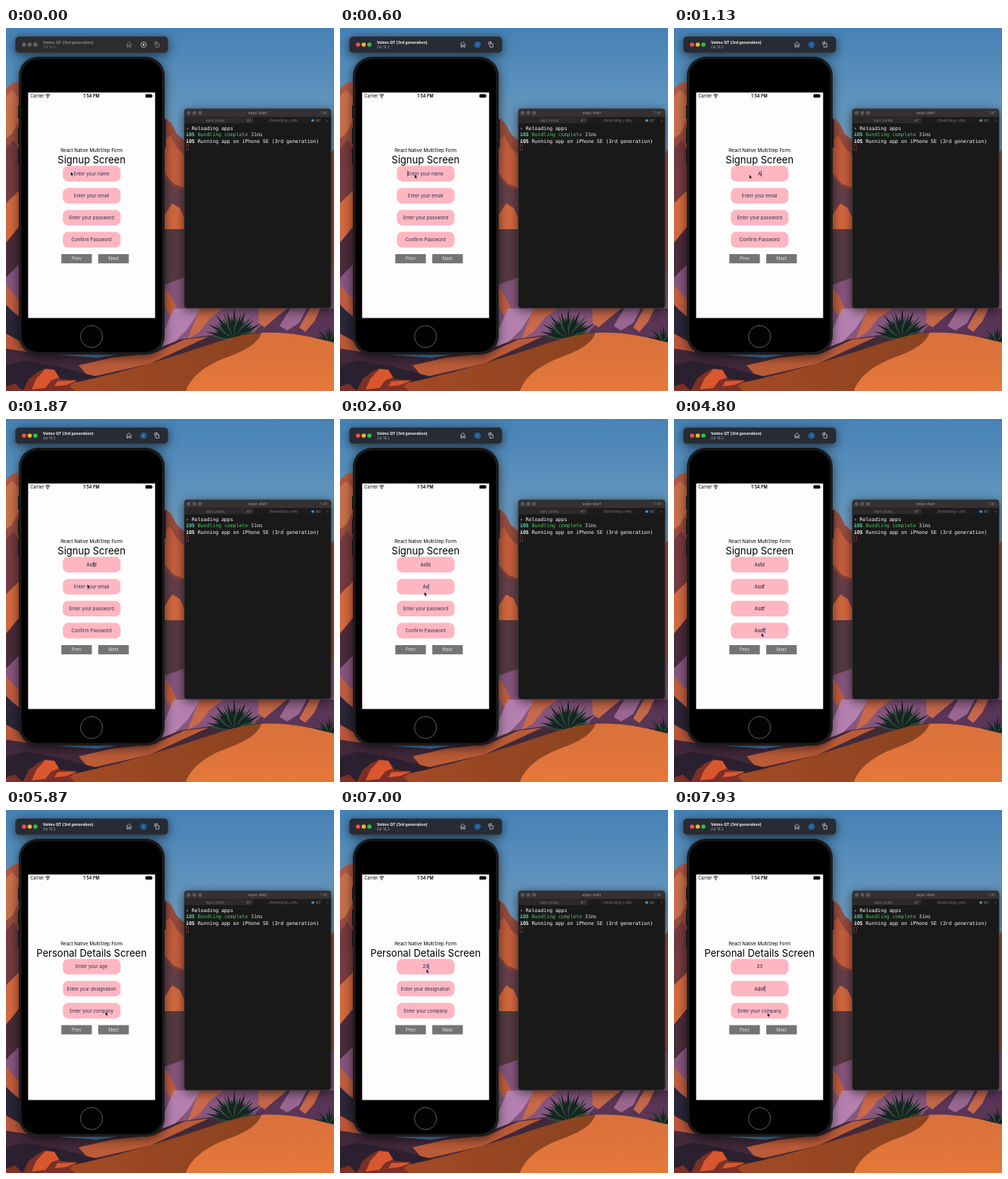
An HTML page that plays this animation: 434 by 480 pixels, repeating every 8000 ms.

```html
<!DOCTYPE html>
<html lang="en">
<head>
<meta charset="utf-8">
<title>Multi-step form demo</title>
<style>
  html, body { margin: 0; width: 100%; height: 100%; overflow: hidden; background: #4682b6; }
  svg { display: block; width: 434px; height: 480px; }
  text { font-family: Inter, "Liberation Sans", sans-serif; white-space: pre; }
  .mono text { font-family: "DejaVu Sans Mono", "Liberation Mono", monospace; font-size: 6.5px; fill: #fff; }
  .tabs text { font-size: 4.4px; fill: #827d7e; text-anchor: middle; }
  .form text { font-size: 6.12px; text-anchor: middle; }
  .form .heading { font-size: 13px; }
  .shadow { filter: drop-shadow(0 3px 7px rgba(0, 0, 0, .6)); }
  #bar { --bg: #2d2b2d; --title: #8b8888; --sub: #747171; --icon: #8d8b8c; --rec: #c9c9c9; --r: #646263; --y: #646263; --g: #646263; --disc: none; }
  #bar.active { --bg: #272b33; --title: #f3f3f5; --sub: #a2a5ad; --icon: #c9ccd2; --rec: #2f8fe0; --r: #fb4f48; --y: #f7b52d; --g: #2fc440; --disc: #164d86; }
</style>
</head>
<body>
<svg viewBox="0 0 434 480">
  <defs>
    <linearGradient id="sky" x2="0" y2="1">
      <stop stop-color="#4682b6"/><stop offset=".45" stop-color="#6295bd"/><stop offset="1" stop-color="#8ba9c4"/>
    </linearGradient>
    <linearGradient id="cliff" x2="0" y2="1">
      <stop stop-color="#b65c43"/><stop offset=".4" stop-color="#8f4840"/><stop offset="1" stop-color="#553039"/>
    </linearGradient>
    <linearGradient id="shade" x2="1" y2="0">
      <stop stop-color="#a94c26"/><stop offset="1" stop-color="#8a431f"/>
    </linearGradient>
    <linearGradient id="dune" x2="0" y2="1">
      <stop stop-color="#d9713c"/><stop offset="1" stop-color="#e5783a"/>
    </linearGradient>
  </defs>

  <!-- Desert -->
  <rect width="434" height="240" fill="url(#sky)"/>
  <path fill="url(#cliff)" d="M0 80 8 73 20 70 60 62 130 70 190 98 211 119 219 126 226 140 240 152V340H0Z"/>
  <path fill="#c8704c" d="M0 90 8 82 18 92 17 122 8 140 0 146Z"/>
  <path fill="#763b40" d="M0 160 10 148 18 162V216L0 228Z"/>
  <path fill="#c65f3e" d="M208 150 217 142 226 158 238 170V212L222 206 208 190Z"/>
  <path fill="#66404a" d="M208 196 222 210 238 216V244L208 232Z"/>
  <path fill="#d4693f" d="M208 250 220 232 230 238 238 256V270H208ZM0 232 18 214V262L0 284Z"/>
  <path fill="#563b42" d="M208 266H238V344H208Z"/>
  <path fill="#4b2c3b" d="M0 284 18 262V312L0 330Z"/>
  <path fill="#9d4c38" d="M428 168 434 160V330H428Z"/>
  <path fill="#87567e" d="M0 330 18 312 208 340 236 330 434 320V430H0Z"/>
  <path fill="#bf5e40" d="M0 340 20 362V384L0 366ZM208 342 216 350 228 374 220 384 208 366Z"/>
  <path fill="#b481ae" d="M222 371H258L240 398 222 416 208 422V404Z"/>
  <path fill="#c9684a" d="M256 371H288L270 384 256 402 240 412 248 392Z"/>
  <path fill="#593556" d="M330 400 348 384 362 371H434V420H330Z"/>
  <path fill="#c4674a" d="M334 371H372L356 384 342 396 334 390ZM402 371H416L408 388 396 402 388 396Z"/>
  <path fill="#996690" d="M376 371H398L388 390 372 400 362 394Z"/>
  <path fill="#2c2639" d="M0 366 8 374 20 384 30 400 60 428 0 432Z"/>
  <path fill="#b9573a" d="M0 404 18 414 44 436 0 428Z"/>
  <path fill="#41293a" d="M0 424 40 430 120 436 200 424 230 412 300 402V480H0Z"/>
  <path fill="#ba5b38" d="M96 446 140 436 196 430 236 412 268 408 190 444 110 462Z"/>
  <path fill="#2b2030" d="M0 446 24 440 70 448 124 462 110 480H0Z"/>
  <g id="agave" fill="none" stroke-linecap="round"></g>
  <path fill="url(#shade)" d="M20 480C110 470 190 444 250 425 290 412 312 404 338 403V480Z"/>
  <path fill="url(#dune)" d="M338 403C372 401 404 408 434 416V480H238C246 458 268 444 296 434 318 426 334 416 338 403Z"/>
  <path fill="#7c3026" d="M22 480 30 464 42 455 52 450 64 452 72 464 94 466 84 474 92 480ZM0 474 12 470 22 480H0Z"/>
  <path fill="#d9572e" d="M34 478 40 464 52 451 64 452 70 462 60 466 52 476ZM68 467 94 466 80 472 64 474Z"/>

  <!-- Phone -->
  <g class="shadow">
    <path fill="#111" d="M16 102h2v18h-2zM16 132h2v21h-2zM16 159h2v21h-2zM209 121h2.3v37h-2.3z"/>
    <rect x="17" y="38" width="193" height="394" rx="25" fill="#1c1c1e"/>
    <rect x="20.5" y="41.5" width="186" height="387" rx="22" fill="#000"/>
  </g>
  <circle cx="113.2" cy="408" r="14.6" fill="#030303" stroke="#666" stroke-width=".9"/>
  <rect x="29.3" y="85.3" width="168" height="298.2" fill="#fdfdfd"/>
  <text x="32.3" y="92" font-size="5.5">Carrier</text>
  <text x="113" y="92" font-size="5.6" font-weight="600" text-anchor="middle">1:54 PM</text>
  <path d="M52.2 89a4 4 0 0 1 6 0M53.4 90.4a2.4 2.4 0 0 1 3.6 0" fill="none" stroke="#000" stroke-width="1"/>
  <circle cx="55.2" cy="91.9" r=".8"/>
  <rect x="184.5" y="87.5" width="8.6" height="4.6" rx="1.2"/><rect x="193.5" y="89" width=".8" height="1.7"/>

  <!-- Simulator bar -->
  <g id="bar">
    <rect class="shadow" x="12.3" y="11.3" width="202" height="21.5" rx="5" fill="var(--bg)" stroke="#42444a" stroke-width=".5"/>
    <circle cx="23.9" cy="22" r="2.8" fill="var(--r)"/>
    <circle cx="31.4" cy="22" r="2.8" fill="var(--y)"/>
    <circle cx="38.9" cy="22" r="2.8" fill="var(--g)"/>
    <text x="48.7" y="21.3" font-size="5.2" font-weight="700" fill="var(--title)">Velmo QT (3rd generation)</text>
    <text x="48.7" y="27.2" font-size="4.7" fill="var(--sub)">Zel 16.2</text>
    <g fill="none" stroke="var(--icon)" stroke-width=".8">
      <path d="M159 22 162.7 18.4 166.4 22M160.2 21.5V25.2H161.7V22.8H163.7V25.2H165.2V21.5"/>
      <path d="M198.2 20.6H202.4V25.2H198.2ZM196.8 22V18.6H200M199 17.4 200.3 18.6 199 19.8"/>
      <circle cx="182" cy="22" r="3.6" style="fill:var(--disc);stroke:var(--rec)"/>
    </g>
    <circle cx="182" cy="22" r="1.4" fill="var(--rec)"/>
  </g>

  <!-- Terminal -->
  <rect class="shadow" x="235.8" y="106.8" width="194.4" height="263.8" rx="4" fill="#191919" stroke="#4c4c4c" stroke-width=".5"/>
  <path fill="#353132" d="M236 118V111a4 4 0 0 1 4-4H426a4 4 0 0 1 4 4V118Z"/>
  <path fill="#2c292a" d="M236 118H328V126H236Z"/>
  <path fill="#1d1b1c" d="M328 118H430V126H328Z"/>
  <path d="M236 118H430M328 118V126M421 118V126" stroke="#131213" stroke-width=".5"/>
  <g fill="#5d5859"><circle cx="241.6" cy="112.3" r="2.5"/><circle cx="249.2" cy="112.3" r="2.5"/><circle cx="256.8" cy="112.3" r="2.5"/></g>
  <g class="tabs">
    <text x="333" y="114.2" style="font-size:5.2px;fill:#a19c9d">expo start</text>
    <text x="420" y="114">⌥⌘1</text>
    <text x="277" y="124">expo (node)</text><text x="321" y="124">⌘1</text>
    <text x="366" y="124">../forest blog (-zsh)</text><text x="413" y="124">⌘2</text>
    <text x="425.5" y="124">+</text>
  </g>
  <circle cx="406" cy="122.3" r="1.9" fill="#3b8fe0"/>
  <g class="mono">
    <text x="238" y="134.7">› Reloading apps</text>
    <text x="238" y="143.3"><tspan fill="#55e3b5" font-weight="700">iOS</tspan><tspan fill="#42cf5c"> Bundling complete</tspan><tspan fill="#d8d8d8"> 31ms</tspan></text>
    <text x="238" y="151.9"><tspan font-weight="700">iOS</tspan> Running app on iPhone SE (3rd generation)</text>
  </g>
  <rect x="238.4" y="154.5" width="3.2" height="7.2" fill="none" stroke="#6b4039" stroke-width=".7"/>

  <g id="forms" class="form"></g>
  <rect id="caret" width=".9" height="7.6" fill="#2c45a0"/>
  <path id="cursor" d="M0 0V5.6L1.3 4.5 2.2 6.6 3.2 6.2 2.3 4.1 4 4Z" stroke="#fff" stroke-width=".4"/>
</svg>
<script>
const LOOP = 8000, FOCUS = 330, SWITCH = 5530, CX = 113.2;
const $ = id => document.getElementById(id);

// blur: when the caret leaves; back: how far the caret sits before the text end
const screens = [
  { title: 'Signup Screen', top: 182.3, fields: [
    { hint: 'Enter your name', value: 'Asfd', focus: 470, keys: [1070, 1200, 1330, 1470], blur: 2130, back: 3.6 },
    { hint: 'Enter your email', value: 'Asdf', focus: 2130, keys: [2400, 2530, 2670, 2800], blur: 3200 },
    { hint: 'Enter your password', value: 'Asdf', focus: 3200, keys: [3400, 3530, 3600, 3730], blur: 4000 },
    { hint: 'Confirm Password', value: 'Asdf', focus: 4000, keys: [4330, 4400, 4530, 4600], blur: SWITCH } ] },
  { title: 'Personal Details Screen', top: 196.9, fields: [
    { hint: 'Enter your age', value: '23', focus: 6330, keys: [6670, 6870], blur: 7270 },
    { hint: 'Enter your designation', value: 'Adsf', focus: 7270, keys: [7470, 7600, 7670, 7730], blur: LOOP },
    { hint: 'Enter your company', value: '', focus: LOOP, keys: [], blur: LOOP } ] }
];

const path = [
  [0, 85.6, 190], [130, 85.6, 190], [530, 98.6, 193.5], [900, 99, 193.5], [1670, 101, 195],
  [1870, 107.6, 218.5], [2070, 111.5, 228.5], [2870, 111.5, 228.5], [3130, 111.5, 252], [3670, 111.5, 252],
  [3870, 111.5, 279.5], [4700, 111.5, 279.5], [5130, 140.5, 302.5], [5270, 141.2, 303.5], [5600, 141.2, 303.5],
  [5870, 131.5, 266.5], [6200, 114, 207], [6950, 114, 207], [7200, 116, 236], [7670, 116, 236],
  [7930, 123.6, 268], [LOOP, 123.6, 268]
];

const label = (y, text, extra = '', x = CX) => `<text x="${x}" y="${y}" ${extra}>${text}</text>`;
const button = (x, y, text) =>
  `<rect x="${x}" y="${y}" width="40.4" height="12.2" fill="#747474"/>` + label(y + 8.3, text, 'fill="#e6e6e6"', x + 20.2);

$('forms').innerHTML = screens.map(({ title, top, fields }) => {
  const bottom = top + fields.length * 29.1;
  return '<g>' + label(top - 18.3, 'React Native MultiStep Form') + label(top - 3.2, title, 'class="heading"') +
    fields.map((f, i) => {
      f.y = top + i * 29.1;
      return `<rect x="75.2" y="${f.y}" width="76.4" height="20.6" rx="7" fill="#ffb6c1"/>` + label(f.y + 12.5, f.hint, 'class="value"');
    }).join('') + button(73.2, bottom + .3, 'Prev') + button(122.1, bottom + .3, 'Next') + '</g>';
}).join('');

const groups = [...$('forms').children];
screens.forEach((s, i) => groups[i].querySelectorAll('.value').forEach((el, j) => s.fields[j].el = el));

// Pointed leaves fanning out from one root
const agave = (x, y, size, count) => Array.from({ length: count }, (_, i) => {
  const a = Math.PI * (1.04 + i / (count - 1) * .92), r = size * (1 + .16 * Math.sin(i * 2.4));
  const dx = Math.cos(a), dy = Math.sin(a), w = size * .07;
  const at = (k, side) => `${x + dx * r * k - dy * w * side} ${y + dy * r * k + dx * w * side}`;
  return `<path d="M${x} ${y}L${at(.45, 1)} ${at(1, 0)} ${at(.45, -1)}Z" fill="${i % 4 ? '#142522' : '#2f4a38'}"/>`;
}).join('');
$('agave').innerHTML = agave(302, 411, 35, 23) + agave(428, 416, 20, 13);

function cursorAt(t) {
  const i = path.findIndex(p => p[0] > t), [t0, x0, y0] = path[i - 1], [t1, x1, y1] = path[i];
  const u = (t - t0) / (t1 - t0), k = u * u * (3 - 2 * u);
  return [x0 + (x1 - x0) * k, y0 + (y1 - y0) * k];
}

function draw(now) {
  const t = now % LOOP, step = +(t >= SWITCH);
  $('bar').classList.toggle('active', t >= FOCUS);
  groups.forEach((g, i) => g.style.display = i === step ? '' : 'none');
  $('caret').style.display = 'none';
  for (const f of screens[step].fields) {
    const n = f.keys.filter(k => t >= k).length;
    f.el.textContent = n ? f.value.slice(0, n) : f.hint;
    f.el.setAttribute('fill', n ? '#111' : '#26324f');
    if (t < f.focus || t >= f.blur) continue;
    const half = f.el.getComputedTextLength() / 2;
    const back = n === f.value.length ? f.back || 0 : 0;
    $('caret').style.display = '';
    $('caret').setAttribute('x', n ? CX + half - .2 - back : CX - half - .6);
    $('caret').setAttribute('y', f.y + 6.5);
  }
  $('cursor').setAttribute('transform', `translate(${cursorAt(t)})`);
  requestAnimationFrame(draw);
}
requestAnimationFrame(draw);
</script>
</body>
</html>
```
